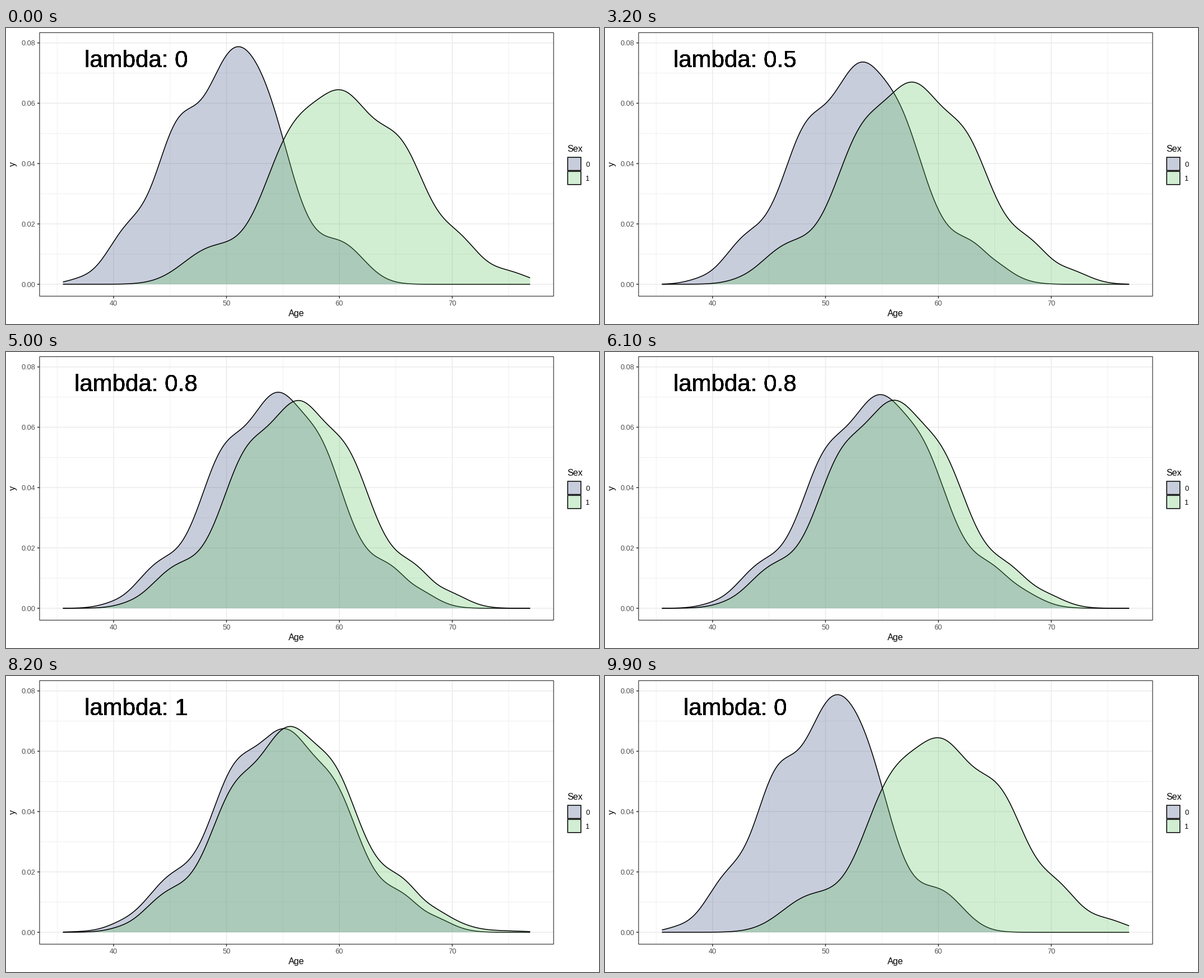
Write a matplotlib script that moves like this. It is 1058 by 529 pixels and loops after 10 s.

```python
import matplotlib.pyplot as plt
import numpy as np
from matplotlib.animation import FuncAnimation
from matplotlib.patches import Rectangle

WIDTH, HEIGHT, DPI = 1058, 529, 64
PT = 72 / DPI  # points per pixel
FRAMES, INTERVAL = 100, 100

LEFT, RIGHT, TOP, BOTTOM = 59.9, 977, 8.3, 479.3
AGE_MIN, AGE_MAX = 35.51, 76.9
LINE = 1.55
GREY, GRID, TICK_TEXT = "#333333", "#ebebeb", "#4d4d4d"
FILLS = [(75 / 255, 91 / 255, 141 / 255, 0.3), (105 / 255, 198 / 255, 106 / 255, 0.3)]
LAMBDAS = [0, 0.5, 0.8, 1]
MOVES = [(5, 25), (31, 50), (55, 74), (80, 99)]  # first and last frame of each transition

# Age density of each sex as bells: centre, spread, height in thousandths.
BELLS = [
    [(36.8, 1.2, 1.1), (41.3, 1.9, 17), (45.55, 1.9, 44.2), (49.65, 2.15, 48.5),
     (53.3, 2.6, 56.5), (60.2, 2.05, 12.6)],
    [(48.6, 2.5, 11.2), (56, 2.77, 47.7), (60.6, 2.3, 45), (65.4, 2.5, 43),
     (70.7, 1.8, 12), (74.9, 1.8, 3.9)],
]


def density(age, bells):
    return sum(h / 1000 * np.exp(-((age - c) / s) ** 2 / 2) for c, s, h in bells)


def quantiles(levels, bells):
    ages = np.linspace(25, 90, 6000)
    cumulative = np.cumsum(density(ages, bells))
    return np.interp(levels, cumulative / cumulative[-1], ages)


def repaired_densities(ages):
    """Densities per lambda and sex, as each sex moves to the mean of both quantiles."""
    levels = 1 / (1 + np.exp(-np.linspace(-12, 12, 1200)))
    quants = np.array([quantiles(levels, bells) for bells in BELLS])
    spacing = np.array([1 / density(q, bells) for q, bells in zip(quants, BELLS)])
    states = []
    for lam in LAMBDAS:
        moved = (1 - lam) * quants + lam * quants.mean(axis=0)
        heights = 1 / ((1 - lam) * spacing + lam * spacing.mean(axis=0))
        states.append([np.interp(ages, q, h, left=0, right=0)
                       for q, h in zip(moved, heights)])
    return np.array(states)


def age_x(age):
    return 192 + 20.14 * (age - 40)


def density_y(value):
    return 458 - 5392 * value


AGES = np.linspace(AGE_MIN, AGE_MAX, 512)
XS = age_x(AGES)
STATES = repaired_densities(AGES)

plt.rcParams["font.family"] = "Liberation Sans"
plt.rcParams["path.snap"] = False
fig = plt.figure(figsize=(WIDTH / DPI, HEIGHT / DPI), dpi=DPI, facecolor="white")
ax = fig.add_axes([0, 0, 1, 1])
ax.set_xlim(0, WIDTH)
ax.set_ylim(HEIGHT, 0)
ax.axis("off")


def line(xs, ys, color, width, z):
    return ax.plot(xs, ys, color=color, lw=width * PT, zorder=z, solid_capstyle="butt")[0]


def text(x, y, string, size, color="black", ha="center", **kwargs):
    return ax.text(x, y, string, fontsize=size * PT, color=color, ha=ha, va="baseline",
                   zorder=8, **kwargs)


def box(x, y, w, h, width, edge, fill="none"):
    ax.add_patch(Rectangle((x, y), w, h, fc=fill, ec=edge, lw=width * PT, zorder=7,
                           joinstyle="miter"))


def draw_axes():
    for age in range(35, 80, 5):
        major = age % 10 == 0
        x = age_x(age)
        line([x, x], [TOP, BOTTOM], GRID, LINE if major else LINE / 2, 1)
        if major:
            line([x, x], [BOTTOM, BOTTOM + 4], GREY, LINE, 6)
            text(x, 496, str(age), 12.8, TICK_TEXT)
    for step in range(9):
        major = step % 2 == 0
        y = density_y(step / 100)
        line([LEFT, RIGHT], [y, y], GRID, LINE if major else LINE / 2, 1)
        if major:
            line([LEFT - 4, LEFT], [y, y], GREY, LINE, 6)
            text(52.4, y + 4.6, f"{step / 100:.2f}", 12.8, TICK_TEXT, "right")
    box(LEFT, TOP, RIGHT - LEFT, BOTTOM - TOP, 1.2, GREY)
    text(518.4, 514.6, "Age", 16)
    text(16.6, 243.4, "y", 16, rotation=90, rotation_mode="anchor")


def draw_legend():
    text(1001, 220.6, "Sex", 16, ha="left")
    for i, fill in enumerate(FILLS):
        middle = 242.8 + 25.2 * i
        box(1002.2, middle - 11.7, 23.5, 23.5, LINE, "black", fill)
        text(1034.4, middle + 4.8, str(i), 12.8, ha="left")


draw_axes()
draw_legend()
areas = [ax.fill([0, 1, 1], [0, 0, 1], fc=fill, lw=0, zorder=2 + 2 * i)[0]
         for i, fill in enumerate(FILLS)]
outlines = [line(XS, XS, "black", LINE, 3 + 2 * i) for i in range(2)]
# Stacked copies give the label its hard edges.
titles = [text(age_x(42), 69.6, "", 42) for _ in range(6)]


def update(frame):
    phase = sum(min(max((frame - a) / (b - a), 0), 1) for a, b in MOVES)
    state = int(phase)
    mix = phase - state
    curves = (1 - mix) * STATES[state % 4] + mix * STATES[(state + 1) % 4]
    base = density_y(0)
    for area, outline, curve in zip(areas, outlines, curves):
        ys = density_y(curve)
        outline.set_ydata(ys)
        area.set_xy(np.column_stack([np.r_[XS[0], XS, XS[-1]], np.r_[base, ys, base]]))
    for title in titles:
        title.set_text(f"lambda: {LAMBDAS[int(phase + 0.5) % 4]}")
    return areas + outlines + titles


animation = FuncAnimation(fig, update, frames=FRAMES, interval=INTERVAL, repeat=True,
                          repeat_delay=0)
plt.show()
```
